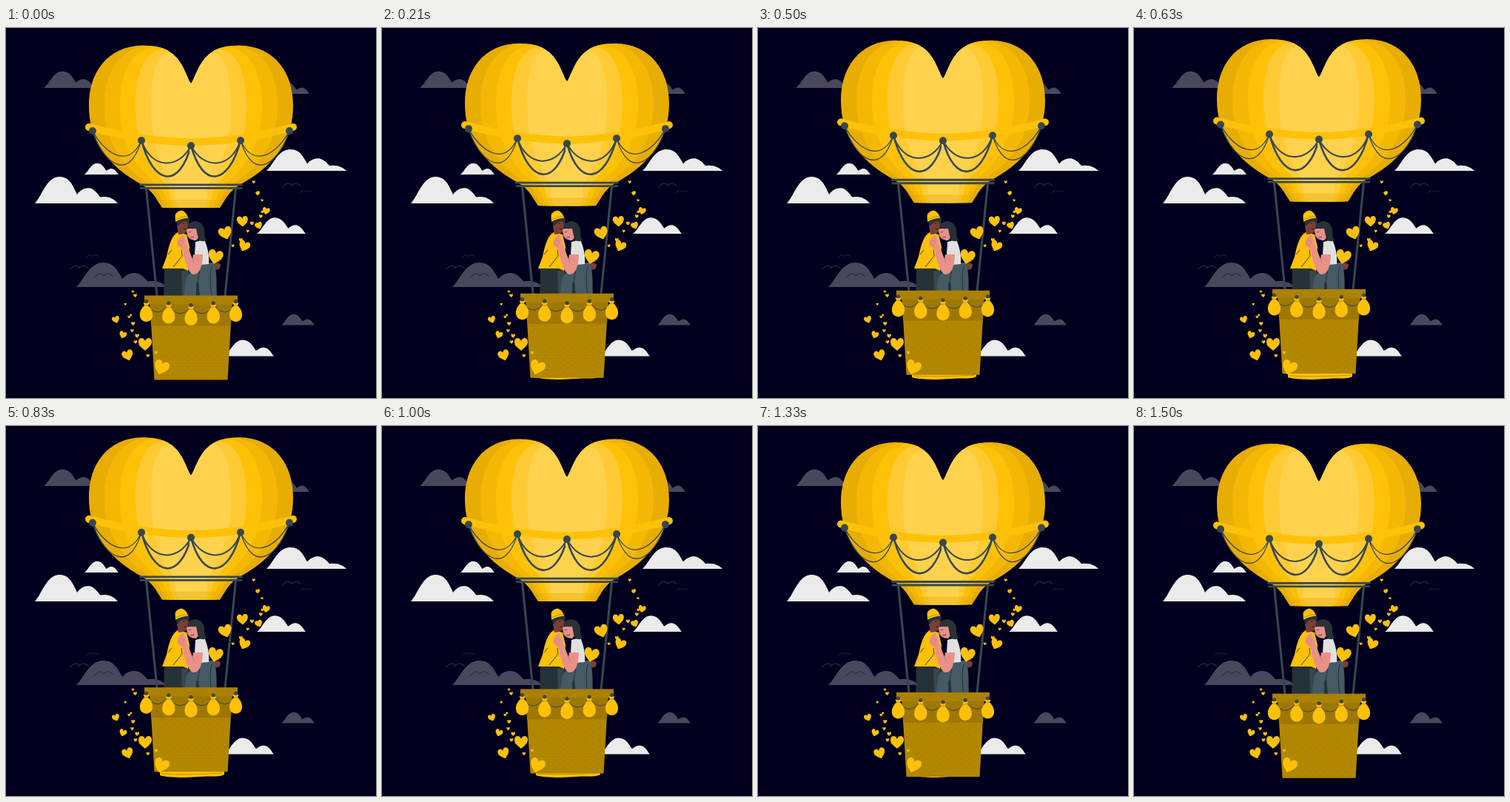
An HTML page for the animation above (1.54 s loop, 500x500 px).

```html
<!DOCTYPE html>
<html lang="en">
<head>
<meta charset="utf-8">
<title>Heart balloon</title>
<style>
  html, body { margin: 0; height: 100%; overflow: hidden; background: #01001f; }
  svg { display: block; width: 100vw; height: 100vh; }
  .line { fill: none; stroke: #37474f; stroke-linecap: round; }
  .bird { fill: none; stroke: #263238; stroke-width: 1.2; stroke-linecap: round; }
</style>
</head>
<body>
<svg viewBox="0 0 500 500">
  <defs>
    <path id="wide" d="M0 0C9 -9 14 -30 30 -30C43 -30 47 -17 51 -10C56 -16 61 -18 67 -17C73 -15 77 -9 79 -7C88 -9 96 -5 100 0Z"/>
    <path id="short" d="M0 0C11 -7 19 -33 37 -33C51 -33 58 -20 64 -11C71 -16 78 -20 85 -16C92 -13 95 -6 100 0Z"/>
    <path id="heart" d="M0 .5C-.2 .32 -.5 .12 -.5 -.17C-.5 -.5 -.1 -.55 0 -.23C.1 -.55 .5 -.5 .5 -.17C.5 .12 .2 .32 0 .5Z"/>
    <path id="bird" d="M-12 3Q-5 -6 0 1Q5 -5 12 1"/>
    <g id="bag">
      <circle cy="-3" r="2.6" fill="#37474f"/>
      <path fill="#ffc107" d="M-4 -1.5Q0 .5 4 -1.5L2.5 2.5C6 6 8.6 10 8.6 15C8.6 21 4.5 24.5 0 24.5S-8.6 21 -8.6 15C-8.6 10 -6 6 -2.5 2.5Z"/>
      <path d="M-2.5 2.5H2.5" stroke="#b28705" stroke-width=".8"/>
    </g>
    <pattern id="weave" width="10" height="8" patternUnits="userSpaceOnUse">
      <path d="M0 1Q2.5 -1 5 1T10 1M0 5Q2.5 7 5 5T10 5M5 1V5M0 5V8" fill="none" stroke="#8d6900" stroke-width=".6" opacity=".4"/>
    </pattern>
  </defs>

  <g fill="#48485c">
    <use href="#short" transform="translate(51 81) scale(.68)"/>
    <use href="#short" transform="translate(362 89) scale(.48)"/>
    <use href="#short" transform="translate(372 401.5) scale(.45)"/>
    <use href="#wide" transform="translate(95 350) scale(1.22 1.1)"/>
  </g>
  <g fill="#ebebeb">
    <use href="#wide" transform="translate(39 237) scale(1.12 1.2)"/>
    <use href="#wide" transform="translate(352 193) scale(1.08 .97)"/>
    <use href="#short" transform="translate(106 198) scale(.46)"/>
    <use href="#short" transform="translate(339 278) scale(.66)"/>
    <use href="#short" transform="translate(295 443.5) scale(.67)"/>
  </g>
  <g class="bird">
    <use href="#bird" x="386" y="212"/>
    <use href="#bird" transform="translate(405 221) scale(.7)"/>
    <use href="#bird" x="99" y="323"/>
    <use href="#bird" transform="translate(117 308) scale(.7)"/>
    <use href="#bird" x="132" y="334"/>
  </g>

  <g id="couple">
    <path fill="#263238" d="M214 322L213 363H247L248 324Z"/>
    <path fill="#37474f" d="M237 328H246V363H238Z"/>
    <path fill="#7b3f36" d="M279 319Q285 316 290 319L289 325Q284 328 279 325Z"/>
    <path fill="#ffc107" d="M232 276C224 280 220 294 217 309L211 325H239L246 328 248 296 244 279Z"/>
    <path d="M237 300L238 308 226 323M219 306L224 300" fill="none" stroke="#263238" stroke-width=".9"/>
    <path fill="#7b3f36" d="M231 259H246Q249 268 245 275Q240 279 233 279L231 268Z"/>
    <path fill="#263238" d="M230 260L246 254Q249 258 247 263Q239 259 234 266L231 268Z"/>
    <path fill="#ffc107" d="M229 262L228.500 253Q230 248 237 246.500Q244 248 246 257Q237 257 229 262Z"/>
    <path d="M229 259Q237 254 246 255" fill="none" stroke="#b28705" stroke-width=".8"/>
    <path d="M239 264H241M244 264H246M240 271Q242 273 244 271" fill="none" stroke="#2b1715" stroke-width=".9"/>
    <path fill="#455a64" d="M263 317H281C286 332 284 347 285 363H240C243 350 241 338 249 330Z"/>
    <path d="M262 328Q257 344 261 362M278 322Q274 336 278 362" fill="none" stroke="#263238" stroke-width="1"/>
    <path fill="#263238" d="M257 345L260 343 262 363H257Z"/>
    <path fill="#e0e0e0" d="M256 289L268 286C273 297 275 309 274 319L263 320 255 305Z"/>
    <path fill="#e99088" d="M244 272L257 269L261 276Q261 284 257 287Q249 287 245 281Z"/>
    <path fill="#263238" d="M245 270C246 259 262 259 266 267C270 273 266 281 271 286C265 291 260 287 259 281L257 271Q250 272 245 270Z"/>
    <path d="M247 276L250 275M249 282Q251 284 254 282" fill="none" stroke="#263238" stroke-width=".8"/>
    <path fill="#e99088" d="M253 306L266 306C266 319 262 333 254 333C247 333 241 316 239 300L231 293Q231 285 239 279Q243 283 245 294L252 312Z"/>
    <path d="M233 290L238 294M235 286L240 290M252 312L254 317" stroke="#b86c66" stroke-width=".8"/>
  </g>

  <path fill="#ffc107" d="M208 455H295V471Q292 474 270 473.500L242 475Q216 475 208 472Z"/>
  <path d="M210 470Q245 472 293 469" fill="none" stroke="#b28705" stroke-width=".8"/>

  <g id="balloon">
    <g id="half">
      <g id="bands"></g>
      <path d="M112 134Q180 153 251 154.500" fill="none" stroke="#ffc107" stroke-width="10" stroke-linecap="round"/>
      <g class="line">
        <path stroke-width="1.300" d="M117 139C132 168 165 192 183 152M117 139C130 180 165 212 183 152"/>
        <path stroke-width="2" d="M183 152C196 191 233 192 250 159"/>
        <path stroke-width="2.600" d="M183 152C199 213 234 218 250 159"/>
        <path stroke-width="3" d="M189.500 217L204 362"/>
      </g>
      <g fill="#37474f">
        <circle cx="117" cy="139" r="5"/>
        <circle cx="183" cy="152" r="5"/>
        <circle cx="250" cy="159" r="5"/>
      </g>
    </g>
    <use href="#half" transform="matrix(-1 0 0 1 500 0)"/>
    <path fill="#e0a500" opacity=".35" d="M203 232H297L289 243H211Z"/>
    <path class="line" stroke-width="2.800" d="M181.500 212H318.500M182 216.500H318"/>

    <path fill="#b48800" d="M194.500 372H305.500L299.500 475.500H200.500Z"/>
    <path fill="#9f7800" d="M194.500 372H305.500L304 402.500H196Z"/>
    <path fill="url(#weave)" d="M194.500 374H305.500L299.500 475.500H200.500Z"/>
    <path fill="#ab8100" d="M187 361.500H313V373.500H187Z"/>
    <path class="line" stroke-width="1" d="M190 374Q204 394 219 374Q234 396 250 377Q266 396 281 374Q296 394 310 374"/>
    <g id="bags"></g>
  </g>

  <g id="hearts" fill="#ffc107"></g>
</svg>
<script>
const el = id => document.getElementById(id);
const repeat = (n, draw) => Array.from({ length: n }, (_, i) => draw(i)).join('');
const mix = (a, b, s) => a + (b - a) * s;

// Nested lobes, from the dark rim to the bright middle
const golds = ['#e8ad03', '#f4b804', '#ffc107', '#ffca34', '#ffd24d'];
el('bands').innerHTML = repeat(golds.length, i => {
  const s = i / (golds.length - 1);
  const side = mix(112, 196, s), waist = mix(184, 227, s), mouth = mix(211, 233, s);
  const topX = mix(185, 222, s), topY = mix(23.5, 33, s * s), inner = mix(246, 252, s);
  return `<path fill="${golds[i]}" d="M${inner} 75H250C246 73 240 44 222 33Q${mix(topX, 222, .5)} ${topY} ${topX} ${topY}
    C${mix(side, topX, .33)} ${topY + 1} ${side} 61 ${side} 105C${side} 150 ${mix(side, waist, .32)} 185 ${waist} 212
    C${mix(waist, mouth, .5)} 219 ${mouth - 7} 232 ${mouth} 243H${inner}Z"/>`;
});

el('bags').innerHTML = repeat(5, i =>
  `<use href="#bag" x="${189.5 + 30.25 * i}" y="${377.5 - 2.5 * Math.abs(i - 2)}"/>`);

let seed = 7;
const random = () => (seed = seed * 16807 % 2147483647) / 2147483647;
const heart = (x, y, size, turn) =>
  `<use href="#heart" transform="translate(${x} ${y}) rotate(${turn}) scale(${size})"/>`;

// Small hearts scattered along a curve that bends through (bx, by)
const trail = (ax, ay, bx, by, cx, cy) => repeat(12, i => {
  const s = i / 11, bend = (a, b, c) => mix(mix(a, b, s), mix(b, c, s), s);
  const drift = () => (random() - .5) * 12;
  return heart(bend(ax, bx, cx) + drift(), bend(ay, by, cy) + drift(), 3 + 3 * random(), drift());
});

const bigHearts = [
  [283, 309, 20, 12], [296.5, 277, 18, -18], [319.5, 261, 15, -4], [322, 294.5, 15, 22],
  [341.5, 267, 10, -20], [351.5, 247, 10, 12], [188, 427, 18, 0], [210, 458.5, 20, 20],
  [164.5, 442, 15, -18], [158, 414.5, 10, 18], [148.5, 394, 10, -20]
];
el('hearts').innerHTML = bigHearts.map(h => heart(...h)).join('')
  + trail(292, 302, 362, 258, 334, 208) + trail(198, 444, 150, 410, 172, 355);

const LOOP = 1540, FLOAT = 1500, LEAD = 30, RISE = 10;
const start = performance.now();
function frame() {
  const t = Math.min((performance.now() - start) % LOOP + LEAD, FLOAT);
  const lift = RISE * (1 - Math.abs(1 - 2 * t / FLOAT));
  el('balloon').setAttribute('transform', `translate(0 ${.35 - lift})`);
  requestAnimationFrame(frame);
}
frame();
</script>
</body>
</html>
```
